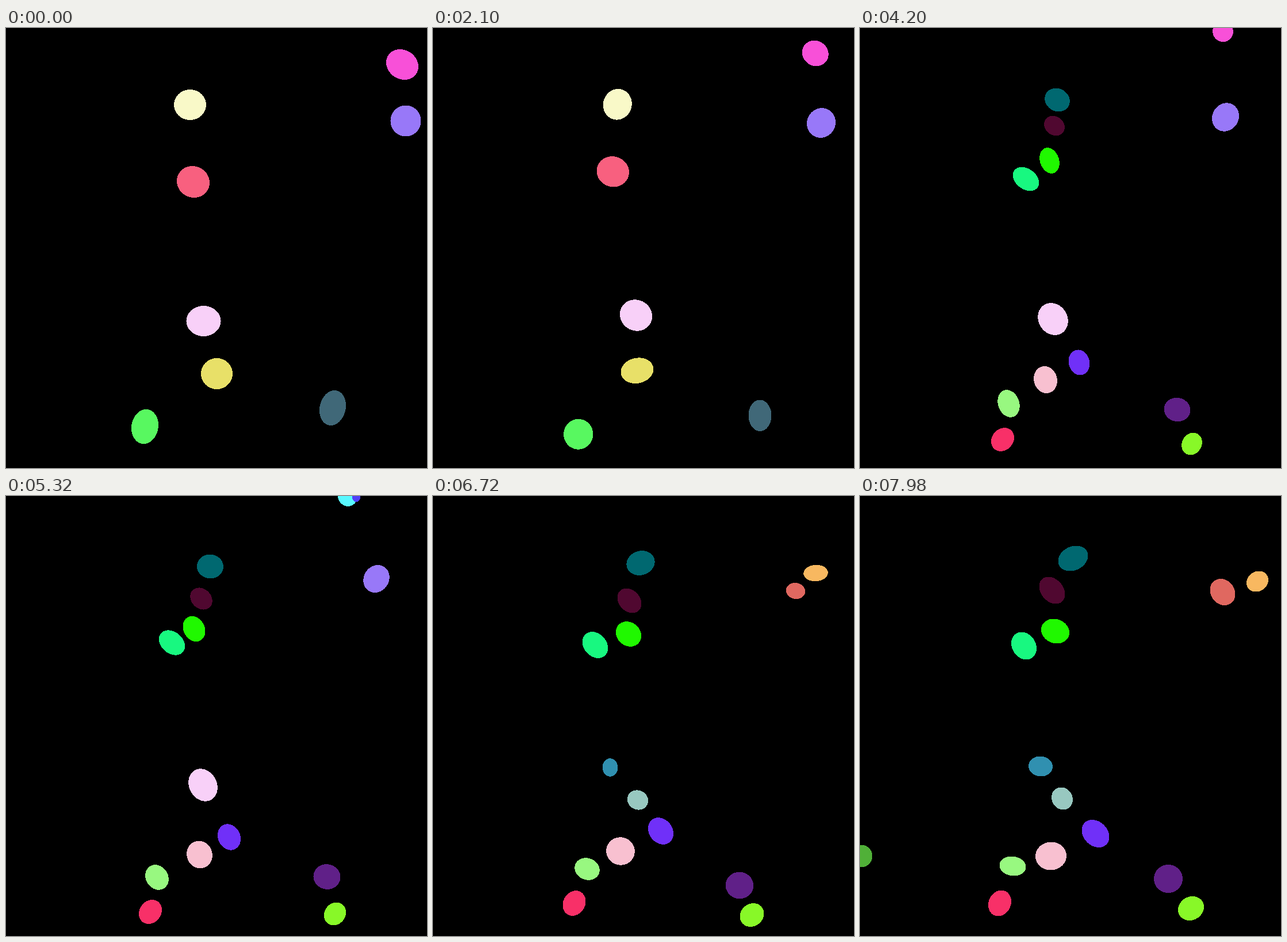
An HTML page for the animation above (8000 ms loop, 732x765 px).

```html
<!DOCTYPE html>
<html lang="en">
<head>
<meta charset="utf-8">
<title>Dividing cells</title>
<style>
  html, body { margin: 0; height: 100%; overflow: hidden; background: #000; }
  svg { display: block; width: 732px; height: 765px; }
</style>
</head>
<body>
<svg id="stage" viewBox="0 0 732 765" shape-rendering="crispEdges"></svg>
<script>
const STEP = 140, LOOP = 8000, LAST = 57;
const KEYS = [0, 9, 21, 30, 38, 48, LAST];   // steps at which centres are given
const stage = document.getElementById('stage');
const cells = [];

const mix = (a, b, u) => a.map((v, i) => v + (b[i] - v) * u);

// A shape is [half width, half height, tilt in degrees]; it changes evenly
// over the cell's life. Centres belong to the keys from birth onward.
function cell(color, young, old, ...centres) {
  return { color, young, old, centres };
}

function live(c, born, end, first, last) {
  const keys = KEYS.filter(k => k >= born && k < end);
  const track = c.centres.map((p, i) => [keys[i], ...p]);
  if (first) track.unshift([born, ...first]);
  if (last) track.push([end, ...last]);
  const path = document.createElementNS('http://www.w3.org/2000/svg', 'path');
  path.setAttribute('fill', c.color);
  stage.append(path);
  cells.push({ ...c, path, born, end, track });
}

// The mother ends midway between her daughters, which start close to there.
function family(split, mother, ...daughters) {
  const [a, b] = daughters.map(d => d.centres[0]);
  const middle = mix(a, b, 0.5);
  live(mother, 0, split, null, middle);
  for (const d of daughters) {
    live(d, split, LAST + 1, mix(middle, d.centres[0], 0.8));
  }
}

function centreAt(track, step) {
  const i = Math.max(1, track.findIndex(p => p[0] >= step));
  const [t0, ...a] = track[i - 1], [t1, ...b] = track[i];
  return mix(a, b, (step - t0) / (t1 - t0));
}

function outline([x, y], [w, h, tilt]) {
  const points = [];
  for (let i = 0; i < 60; i++) {
    const t = i * Math.PI / 30;
    const px = x + w * Math.cos(t);
    const py = y + h * Math.sin(t + tilt * Math.PI / 180);
    points.push(px.toFixed(2) + ' ' + py.toFixed(2));
  }
  return 'M' + points.join('L') + 'Z';
}

// Upper left
family(25,
  cell('#f9f9c8', [28, 26.5, 0], [23, 27, -4], [320, 133.5], [317, 127], [324.5, 138.5]),
  cell('#006870', [21, 20, 10], [26, 22, -12], [343, 125], [355, 122.5], [361, 116.5], [370.5, 108.5]),
  cell('#500830', [17, 16, 8], [22.5, 23.5, 17], [338, 170], [339.5, 178.5], [341.5, 182], [334, 164]));
family(25,
  cell('#f8607f', [28.5, 27.5, 3], [28, 26, 2], [325.5, 267.5], [312.5, 261], [313, 238.5]),
  cell('#20f800', [16, 22.5, 13], [24.5, 21.5, 7], [329.5, 230.5], [327, 231], [340, 240], [339.5, 235]),
  cell('#18f880', [23, 20, 20], [22, 24, 11], [288.5, 262.5], [288.5, 255], [282, 259], [285, 260.5]));

// Centre
family(44,
  cell('#f8d0f8', [30, 26.5, 0], [24.5, 28.5, 11],
    [343.5, 509.5], [353, 493], [353, 506], [335.5, 506], [342.5, 502.5]),
  cell('#3090b0', [10, 15, 0], [21, 17.5, 2], [308, 472], [314, 470]),
  cell('#98c8c0', [18, 16, 4], [18.5, 19.5, 6], [356, 528.5], [351.5, 526]));
family(16,
  cell('#e8e068', [27.5, 27, 0], [28.5, 22, -7], [366.5, 601], [353, 598.5]),
  cell('#7030f8', [15.5, 21, 2], [24, 24, 14],
    [377, 582.5], [381, 581.5], [388, 593], [396, 582.5], [409.5, 587]),
  cell('#f8c0d0', [17, 23, 8], [27, 24.5, -1],
    [333.5, 608], [322.5, 611.5], [336.5, 623.5], [326, 617.5], [332, 626]));

// Lower left
family(25,
  cell('#58f860', [23.5, 30, -5], [27, 24, 3], [241.5, 693], [251.5, 711.5], [254, 701]),
  cell('#98f880', [18.5, 25, 11], [23, 17, 5], [258.5, 653], [262.5, 663], [268, 648.5], [265.5, 643.5]),
  cell('#f83068', [20, 20, -10], [20, 22.5, -8], [248, 715.5], [251, 723], [245.5, 708], [243, 708]));

// Lower right
family(25,
  cell('#406878', [23, 30.5, -8], [18, 25, 6], [568, 660.5], [567.5, 664.5], [569.5, 683]),
  cell('#602088', [22.5, 20, 3], [25, 24.5, 0], [551.5, 663.5], [558, 662], [533, 677], [536, 665.5]),
  cell('#88f828', [17, 19, -8], [22.5, 21, -7], [577, 723], [572, 726.5], [554.5, 728.5], [575.5, 717]));

// Upper right; the first pair drifts out over the top edge
family(34,
  cell('#f850d8', [28, 26.5, 8], [16.5, 17, 0], [689, 63.5], [681.5, 65], [648, 23], [631, 6]),
  cell('#58f8ff', [18, 21, 0], [18, 21, 0], [594.5, -3], [580, -120], [580, -120]),
  cell('#5040f8', [7.5, 10.5, 0], [7.5, 10.5, 0], [609, 0], [610, -70], [610, -70]));
family(45,
  cell('#9878f8', [26.5, 27, 0], [22, 23.5, -8],
    [695, 161.5], [687.5, 170.5], [662.5, 159.5], [635.5, 155], [644, 144]),
  cell('#f8b860', [22, 13, -1], [19, 18, -8], [665.5, 134], [691, 148.5]),
  cell('#e06860', [15, 11, 2], [22, 23, 9], [630.5, 165], [630.5, 167]));

// Late arrival from the left
live(cell('#50b038', [19.5, 19.5, 0], [19.5, 19.5, 0], [-60, 624], [2, 626]), 48, LAST + 1);

function draw(time) {
  const step = Math.floor(time % LOOP / STEP);
  for (const c of cells) {
    const alive = step >= c.born && step < c.end;
    const age = (step - c.born) / (Math.min(c.end, LAST) - c.born);
    c.path.setAttribute('d', alive ? outline(centreAt(c.track, step), mix(c.young, c.old, age)) : '');
  }
}

const start = performance.now();
function tick() {
  draw(performance.now() - start);
  requestAnimationFrame(tick);
}
tick();
</script>
</body>
</html>
```
